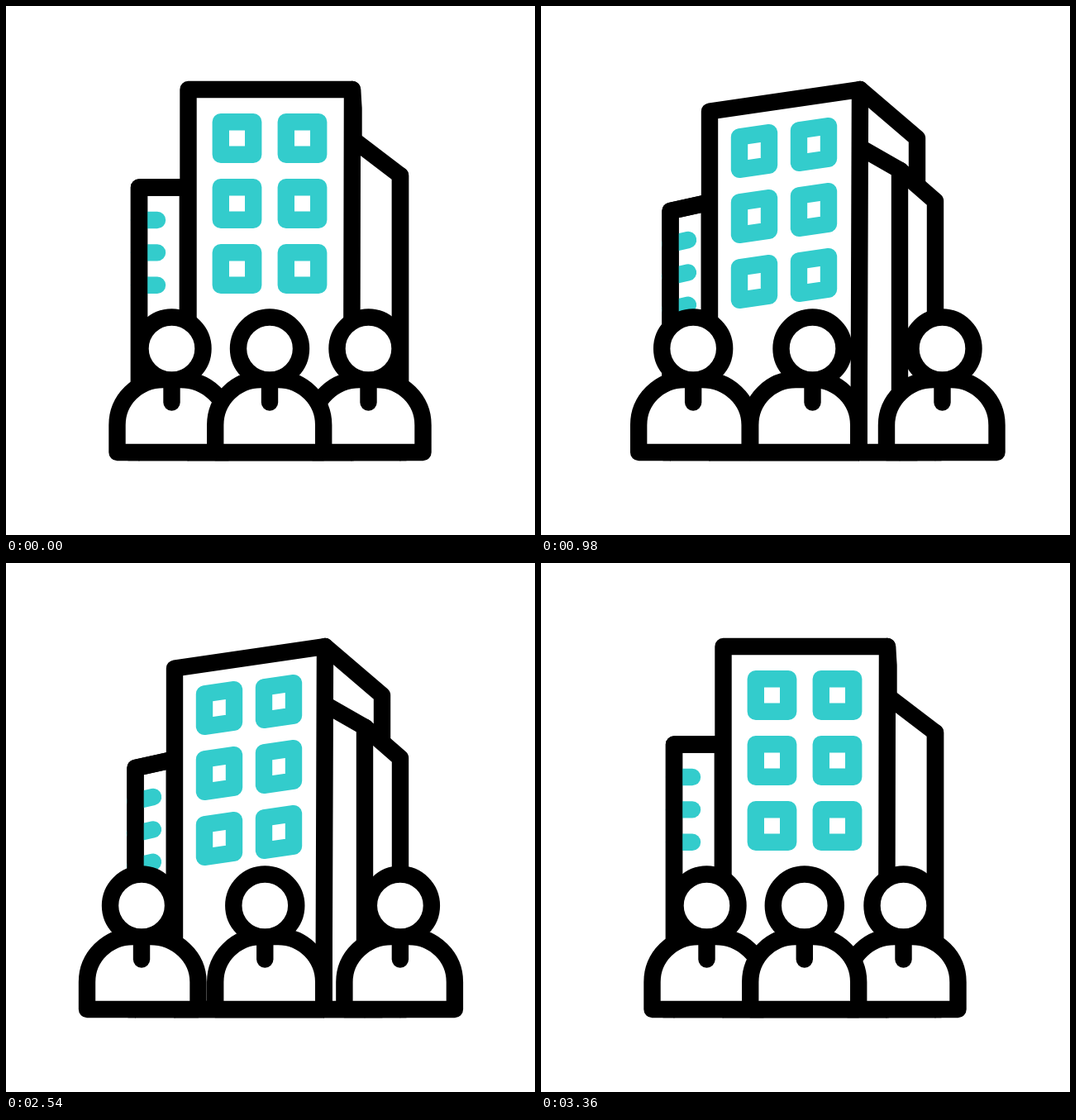
These frames come from a looping animation (640 px wide and 640 px high, 3.88 s). An HTML page with a canvas:

```html
<!DOCTYPE html>
<html lang="en">
<head>
<meta charset="utf-8">
<title>Office team</title>
<style>
  html, body { margin: 0; width: 100%; height: 100%; overflow: hidden; background: #fff; }
  canvas { display: block; width: 100vw; height: 100vh; object-fit: contain; }
</style>
</head>
<body>
<canvas id="stage" width="640" height="640"></canvas>
<script>
const ctx = document.getElementById('stage').getContext('2d');
const LOOP = 3880, BASE = 540;
const INK = '#000', TEAL = '#33cccc', PAPER = '#fff';

// Eased progress from 0 to 1 between two moments.
function ease(t, from, to) {
  const u = Math.min(1, Math.max(0, (t - from) / (to - from)));
  return u * u * (3 - 2 * u);
}

const mix = (a, b, p) => a + (b - a) * p;

function path(points, color, { close = false, fill = false } = {}) {
  ctx.beginPath();
  points.forEach(([x, y]) => ctx.lineTo(x, y));
  if (close) ctx.closePath();
  if (fill) {
    ctx.fillStyle = PAPER;
    ctx.fill();
  }
  ctx.strokeStyle = color;
  ctx.stroke();
}

// p: 0 = seen from the front, 1 = turned
function drawBuilding(p) {
  const at = (x0, y0, x1, y1) => [mix(x0, x1, p), mix(y0, y1, p)];
  const solid = { fill: true };

  // left wing
  const wing = at(161, 219.5, 156.5, 248);
  const wingEnd = at(220, 219.5, 204, 237.5);
  const wall = [[wing[0], BASE], wing, wingEnd, [wingEnd[0], BASE]];
  path(wall, INK, solid);
  for (let i = 0; i < 3; i++) {
    const y = i * 39.4;
    path([at(161, 259 + y, 156, 288 + y), at(183, 259 + y, 178, 283 + y)], TEAL);
  }
  path(wall, INK);

  const topLeft = at(220.5, 101, 204, 127.5);
  const topRight = at(419, 101, 386, 101);
  const edgeX = mix(418, 384.5, p);

  // tower side
  const back = at(420.5, 124, 455, 160);
  path([topRight, back, [back[0], BASE], [edgeX, BASE]], INK, solid);

  // right wing
  const corner = at(477, 205, 434, 198.5);
  path([[edgeX, BASE], at(418, 160, 385, 170.5), corner,
        [477, 236], [477, BASE]], INK, solid);
  path([corner, [corner[0], BASE]], INK);

  // tower front
  path([[topLeft[0], BASE], topLeft, topRight, [edgeX, BASE]], INK,
       { close: true, fill: true });

  // windows
  const w = mix(19.7, 18, p), h = 19.7, slant = -0.145 * p * w;
  for (let row = 0; row < 3; row++) {
    for (const [x, y] of [at(279.5, 160, 258, 175.5), at(358.5, 160, 330, 167.5)]) {
      const cy = y + row * 79;
      path([[x - w, cy - h - slant], [x + w, cy - h + slant],
            [x + w, cy + h + slant], [x - w, cy + h - slant]], TEAL, { close: true });
    }
  }

  path([[148, BASE], [484, BASE]], INK);
}

// left and right: half widths of the shoulders
function drawPerson(x, left, right, head = x, tie = x) {
  const neck = 10.5, shoulder = 507, r = 55;
  ctx.beginPath();
  ctx.moveTo(x - left, BASE);
  ctx.lineTo(x - left, shoulder);
  ctx.ellipse(x - neck, shoulder, left - neck, r, 0, Math.PI, Math.PI * 1.5);
  ctx.ellipse(x + neck, shoulder, right - neck, r, 0, Math.PI * 1.5, Math.PI * 2);
  ctx.lineTo(x + right, BASE);
  ctx.closePath();
  ctx.fillStyle = PAPER;
  ctx.fill();
  ctx.strokeStyle = INK;
  ctx.stroke();

  path([[tie, 452], [tie, 479.5]], INK);

  ctx.beginPath();
  ctx.arc(head, 414.5, 38, 0, Math.PI * 2);
  ctx.fill();
  ctx.stroke();
}

function draw(t) {
  const turn = ease(t, 0, 560) - ease(t, 2560, 3360);
  const goRight = ease(t, 240, 800) - ease(t, 2388, 2948);
  const goLeft = ease(t, 760, 1320) - ease(t, 2366, 2926);
  const lookRight = 9.5 * ease(t, 320, 880);
  const lookBack = 9.8 * ease(t, 2230, 2910);
  const head = 319 + lookRight - 19.5 * ease(t, 993, 1553) + lookBack;
  const tie = 319 + lookRight - 19.5 * ease(t, 1060, 1610) + lookBack;

  ctx.fillStyle = PAPER;
  ctx.fillRect(0, 0, 640, 640);
  ctx.lineWidth = 20.4;
  ctx.lineCap = ctx.lineJoin = 'round';

  drawBuilding(turn);
  drawPerson(200.5 - 47.5 * goLeft, 66, 68.5);
  drawPerson(438.5 + 47 * goRight, 67.5, 66);
  drawPerson(318.7, 65.5, 65.5, head, tie);
}

function tick(now) {
  draw(now % LOOP);
  requestAnimationFrame(tick);
}

draw(0);
requestAnimationFrame(tick);
</script>
</body>
</html>
```
